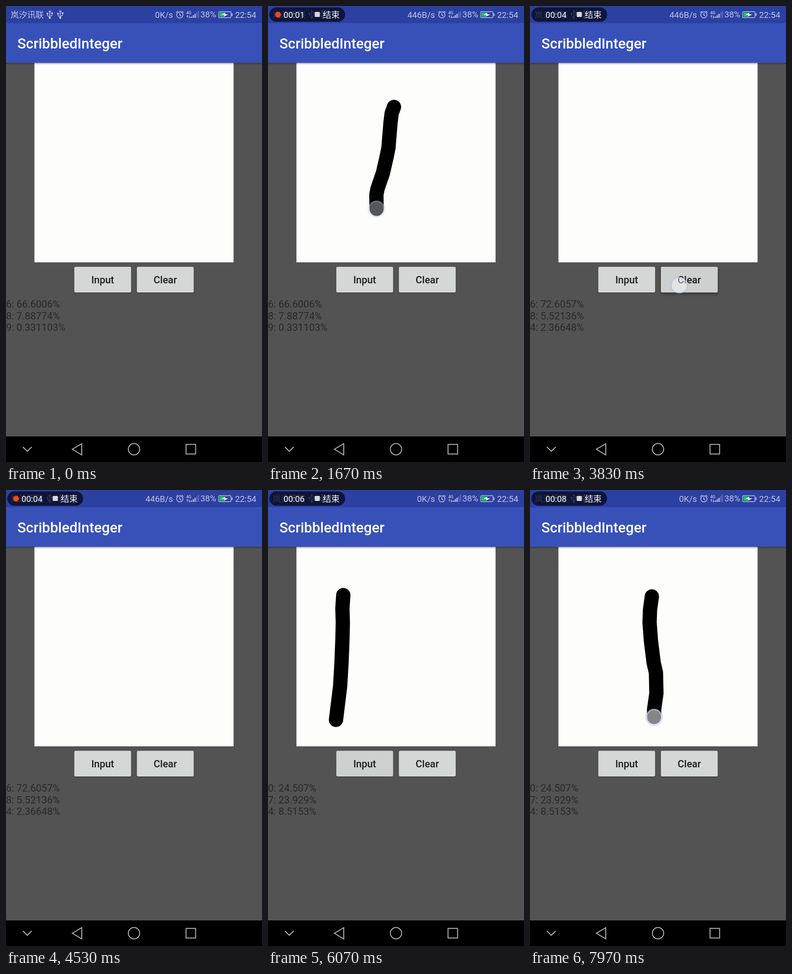
Write an HTML page that moves like this. It is 561 px wide and 998 px high and loops after 8 s.

```html
<!DOCTYPE html>
<html lang="zh">
<head>
<meta charset="utf-8">
<title>Handwriting recognition demo</title>
<style>
  html, body { margin: 0; width: 100%; height: 100%; overflow: hidden; background: #535353; }
  svg { display: block; width: 100vw; height: 100vh; font-family: Roboto, "Noto Sans CJK SC", "Noto Sans CJK", sans-serif; }
  .status { fill: #c0c6e3; font-size: 18.7px; }
  .cjk { font-family: "Noto Sans CJK SC", "Noto Sans CJK", sans-serif; font-size: 18.3px; }
  .medium { font-weight: 500; }
  .title { font-size: 31.2px; fill: #fff; }
  .line { fill: none; stroke: #c0c6e3; stroke-width: 1.6; }
  .nav { fill: none; stroke: #b4b4b4; stroke-width: 2; }
  .ink { fill: none; stroke: #000; stroke-width: 31.3; stroke-linecap: round; stroke-linejoin: round; }
  .face { fill: #d5d6d6; }
  .label { font-size: 21.8px; text-anchor: middle; fill: #1c1c1c; }
  .results { font-size: 21.8px; fill: #292929; }
  .pill text { fill: #fff; font-size: 18.5px; }
</style>
</head>
<body>
<svg viewBox="0 0 561 998" preserveAspectRatio="none">
  <defs>
    <linearGradient id="barShadow" x2="0" y2="1">
      <stop stop-color="#000" stop-opacity=".32"/>
      <stop offset="1" stop-color="#000" stop-opacity="0"/>
    </linearGradient>
    <filter id="soft" x="-30%" y="-30%" width="160%" height="160%"><feGaussianBlur stdDeviation="1"/></filter>
    <g id="usb">
      <path class="line" d="M0 -8V7M-5 -2V1Q-5 3 0 5M5 -3V0Q5 2 0 4"/>
      <path fill="#c0c6e3" d="M0 -10l3 4h-6zM-7 -4h4v3h-4zM3 -5h4v3h-4z"/>
      <circle cy="7" r="2.3" fill="#c0c6e3"/>
    </g>
  </defs>

  <rect width="561" height="998" fill="#535353"/>
  <rect x="62.3" y="124" width="436.4" height="437" fill="#fdfdfc"/>
  <rect y="124" width="561" height="5" fill="url(#barShadow)"/>
  <rect width="561" height="38" fill="#2c40a2"/>
  <rect y="37.5" width="561" height="87" fill="#3851b8"/>
  <text class="medium title" x="25" y="93">ScribbledInteger</text>

  <g class="status">
    <text class="cjk" x="10" y="26">岚汐讯联</text>
    <use href="#usb" x="96" y="19"/>
    <use href="#usb" x="119" y="19"/>
    <text id="speed" x="366" y="26" text-anchor="end">0K/s</text>
    <circle class="line" cx="381" cy="19.5" r="6.8"/>
    <path class="line" d="M381 15.5V20l3 2M373 14.5l4 -3.5M389 14.5l-4 -3.5"/>
    <text class="medium" x="395" y="18" font-size="9" style="font-size:9px">4G</text>
    <path class="line" style="stroke-width:1.2" d="M398 26v-5l-2 2M402 21v5l2 -2"/>
    <path fill="#c0c6e3" d="M405.5 23h2.4v3h-2.4zM409.3 20h2.4v6h-2.4zM413.1 17h2.4v9h-2.4z"/>
    <path fill="#c0c6e3" opacity=".35" d="M416.9 13.5h2.4V26h-2.4zM420.7 10.5h2.4V26h-2.4z"/>
    <text x="426" y="25">38%</text>
    <rect class="line" x="466" y="12.5" width="27" height="13" rx="2" style="stroke-width:1.3"/>
    <rect x="494.3" y="16" width="2" height="6"/>
    <rect x="468" y="14.5" width="11" height="9" fill="#18c85a"/>
    <path fill="#fff" d="M472 19l9 -4 -1 3 7 .5 -9 4.5 1 -3.5z"/>
    <text x="502" y="26">22:54</text>
  </g>

  <g id="pill" class="pill">
    <rect x="3" y="3" width="166" height="31.5" rx="15.7" fill="#04081a" opacity=".76"/>
    <circle id="dot" cx="22" cy="19" r="6.5" fill="#ff4319"/>
    <text id="timer" x="34" y="26">00:00</text>
    <rect x="102.5" y="13" width="11" height="11" rx="1" fill="#d9d9dc"/>
    <text class="cjk" x="120" y="26">结束</text>
  </g>

  <g id="inks"></g>

  <g id="input" transform="translate(149.6 570.8)">
    <rect class="face" width="124.6" height="56.2" rx="3"/>
    <rect class="ripple" width="124.6" height="56.2" rx="3"/>
    <text class="label medium" x="62.3" y="36.6">Input</text>
  </g>
  <g id="clear" transform="translate(286.8 570.8)">
    <rect class="face" width="124.6" height="56.2" rx="3"/>
    <rect class="ripple" width="124.6" height="56.2" rx="3"/>
    <text class="label medium" x="62.3" y="36.6">Clear</text>
  </g>

  <g class="results">
    <text y="660"></text>
    <text y="685.5"></text>
    <text y="711"></text>
  </g>

  <rect y="942" width="561" height="56"/>
  <path class="nav" d="M37 965l9.7 9.5 9.7 -9.5M166 958v24.5L145.5 970z"/>
  <circle class="nav" cx="280.5" cy="970" r="12.4"/>
  <rect class="nav" x="394.5" y="959.5" width="21" height="21"/>

  <g id="touch">
    <circle r="17" fill="none" stroke="#8fa3dc" stroke-width="3" opacity=".55" filter="url(#soft)"/>
    <circle r="16" fill="#fff" opacity=".52"/>
    <circle r="16.5" fill="none" stroke="#e6ebfa" stroke-width="1.5" opacity=".8"/>
  </g>
</svg>

<script>
const LOOP = 8000, INK_LAG = 70;
const $ = selector => document.querySelector(selector);
const clamp = x => Math.min(1, Math.max(0, x));
const ramp = (t, from, to) => clamp((t - from) / (to - from));
const latest = (steps, t) => steps.filter(([at]) => at <= t).pop()[1];

const strokes = [
  { down: 820, up: 1500, gone: 3800,
    d: 'M276 221L271 235 268.500 255 264 310 260 330 252 365 240 400 237.500 413 238 444' },
  { down: 4900, up: 5350, gone: 7100,
    d: 'M165 230L163 260 164 290 163 330 161 380 158 430 149 503' },
  { down: 7430, up: 7895, gone: LOOP,
    d: 'M267 233L263 262 262 290 265 330 271 378 276 400 277 445 272 480 272 497' }
];
const presses = [
  { button: 'input', down: 2130, up: 2250, x: 209, y: 604 },
  { button: 'clear', down: 3680, up: 3800, x: 327, y: 611 },
  { button: 'input', down: 5500, up: 5620, x: 207, y: 602 },
  { button: 'clear', down: 6980, up: 7100, x: 328, y: 609 }
];
const results = [
  [0, ['6: 66.6006%', '8: 7.88774%', '9: 0.331103%']],
  [2250, ['6: 72.6057%', '8: 5.52136%', '4: 2.36648%']],
  [5620, ['0: 24.507%', '7: 23.929%', '4: 8.5153%']]
];
const speeds = [[0, '0K/s'], [1600, '446B/s'], [4600, '0K/s']];
const blinks = [630, 1490, 2500, 3600, 4480, 5500, 6500, 7500];
const BLINK = 215;

for (const s of strokes) {
  s.path = document.createElementNS('http://www.w3.org/2000/svg', 'path');
  s.path.setAttribute('class', 'ink');
  s.path.setAttribute('d', s.d);
  $('#inks').append(s.path);
  s.length = s.path.getTotalLength();
}

const touch = $('#touch');
const resultLines = document.querySelectorAll('.results text');

function setText(node, text) {
  if (node.textContent !== text) node.textContent = text;
}

function touchAlpha(t, down, up) {
  return ramp(t, down - 40, down + 20) * (1 - ramp(t, up, up + 200));
}

function placeTouch(x, y, alpha) {
  touch.setAttribute('transform', `translate(${x} ${y})`);
  touch.setAttribute('opacity', alpha);
}

function drawStrokes(t) {
  for (const s of strokes) {
    const inked = ramp(t - INK_LAG, s.down, s.up) * s.length;
    s.path.style.display = t >= s.down && t < s.gone ? '' : 'none';
    s.path.style.strokeDasharray = `${inked} ${s.length * 2}`;
    const alpha = touchAlpha(t, s.down, s.up + 100);
    if (alpha > 0) {
      const p = s.path.getPointAtLength(ramp(t, s.down, s.up) * s.length);
      placeTouch(p.x, p.y, alpha);
    }
  }
}

function drawButtons(t) {
  const look = { input: { tint: 0, lift: 0 }, clear: { tint: 0, lift: 0 } };
  for (const { button, down, up, x, y } of presses) {
    const state = look[button];
    state.tint += ramp(t, up + 10, up + 80) * (1 - ramp(t, up + 100, up + 600));
    state.lift += ramp(t, down, up) * (1 - ramp(t, up + 30, up + 110));
    const alpha = touchAlpha(t, down, up);
    if (alpha > 0) placeTouch(x, y, alpha);
  }
  for (const [id, { tint, lift }] of Object.entries(look)) {
    $(`#${id} .ripple`).setAttribute('opacity', tint * 0.11);
    $(`#${id} .face`).style.filter =
      `drop-shadow(0 ${1.5 + 2 * lift}px ${1.3 + 2 * lift}px rgba(0,0,0,.42))`;
  }
}

function drawRecorder(t) {
  const seconds = blinks.filter(at => t >= at + BLINK).length;
  $('#pill').setAttribute('opacity', ramp(t, 25, 190));
  $('#dot').setAttribute('opacity', blinks.some(at => t >= at && t < at + BLINK) ? 1 : 0);
  setText($('#timer'), `00:0${seconds}`);
}

function render(t) {
  placeTouch(0, 0, 0);
  drawStrokes(t);
  drawButtons(t);
  drawRecorder(t);
  setText($('#speed'), latest(speeds, t));
  latest(results, t).forEach((line, i) => setText(resultLines[i], line));
}

let start;
function tick(now) {
  start ??= now;
  render((now - start) % LOOP);
  requestAnimationFrame(tick);
}
render(0);
requestAnimationFrame(tick);
</script>
</body>
</html>
```
